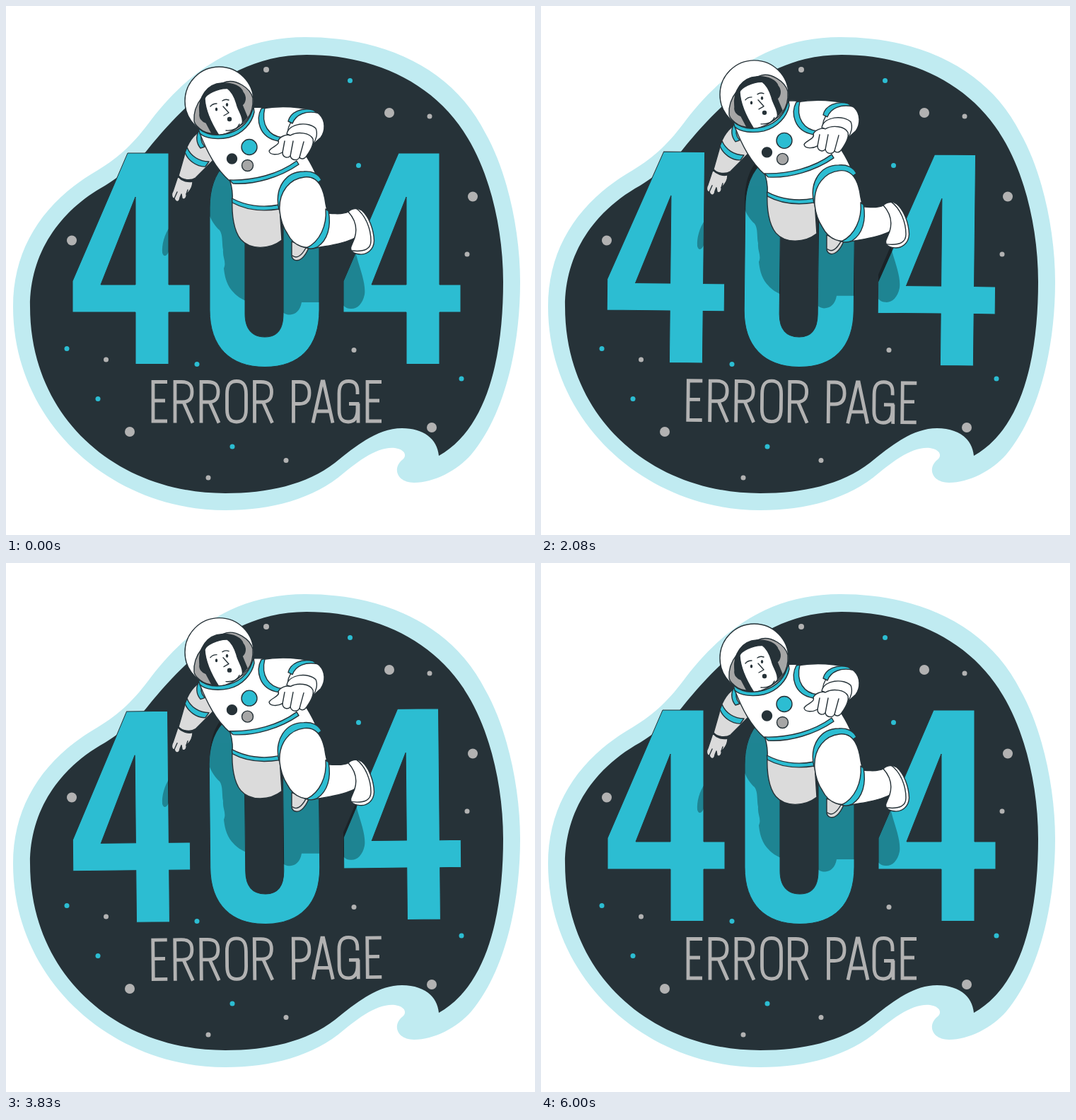
Animation, 748 px wide and 748 px high, one loop 6.04 s. Source, as an HTML page:

```html
<!DOCTYPE html>
<html lang="en">
<head>
<meta charset="utf-8">
<title>Error page</title>
<style>
html, body { margin: 0; width: 100%; height: 100%; overflow: hidden; background: #fff; }
svg { display: block; width: 100%; height: 100%; }
.w { fill: #fff; }
.g { fill: #dbdbdb; }
.m { fill: #a6a6a6; }
.c { fill: #2cbdd2; }
.d { fill: #263238; }
.n { fill: none; }
#hero { stroke: #263238; stroke-width: 1.4; stroke-linejoin: round; stroke-linecap: round; }
#hero .flat { stroke: none; }
</style>
</head>
<body>
<svg viewBox="0 0 748 748" role="img" aria-label="404 ERROR PAGE">
  <defs>
    <path id="four" d="M172 208H230V394H260V433H230V506.5H183V433H94V389ZM183 270L134 394H183Z"/>
    <path id="zero" d="M288 285C288 232 317 204 366 204S443 232 443 285V430C443 482 415 510.5 366 510.5S288 482 288 430ZM338 280V435C338 457 348 468 366 468S392 457 392 435V280C392 258 383 246 366 246S338 258 338 280Z"/>
    <clipPath id="digits" clip-rule="evenodd">
      <use href="#four"/><use href="#four" x="383"/><use href="#zero"/>
    </clipPath>
  </defs>

  <path fill="#c0ebf1" d="M10 425C10 340 55 275 130 232C160 214 182 193 206 160C256 96 322 44 423 44C540 44 634 92 678 180C709 235 727 318 727 390C727 482 705 578 658 634C638 657 605 674 577 674C553 674 546 654 560 642C568 636 564 627 550 625C528 623 505 638 478 660C435 697 375 713 310 713C150 713 10 590 10 425Z"/>
  <path class="d" d="M34 425C34 350 75 290 140 254C168 236 185 222 201 202C253 138 322 69 425 69C522 69 608 110 653 187C684 238 703 315 703 390C703 485 685 595 612 636C610 612 590 597 560 597C525 597 495 622 465 646C425 677 370 689 310 689C158 689 34 584 34 425Z"/>
  <g id="stars"></g>

  <g id="number" class="c" fill-rule="evenodd" stroke="#263238">
    <use href="#four"/><use href="#zero"/><use href="#four" x="383"/>
  </g>
  <g id="caption" fill="none" stroke="#b2b2b2" stroke-width="4.8" stroke-miterlimit="8">
    <path id="E" d="M228 531.500H208V587H228M208 558H225"/>
    <path id="R" d="M239 589.500V531.500H248C259 531.500 263 536 263 545.500S259 560 249 560H239M251 560L264 589.500"/>
    <use href="#R" x="37"/>
    <path d="M312.500 549C312.500 536 316.500 530.500 326 530.500S339.500 536 339.500 549V570C339.500 582 335.500 588 326 588S312.500 582 312.500 570Z"/>
    <use href="#R" x="112.500"/>
    <path d="M406.500 589.500V531.500H415C425 531.500 429 537 429 547S425 562.500 415 562.500H406.500"/>
    <path d="M434 589.500L447 531H449L462 589.500M437.500 573H458.500"/>
    <path d="M497 549V545C497 535 493 530.500 484.500 530.500C475 530.500 471 536 471 548V571C471 583 475 588 484 588C493 588 497 582 497 570V562.500H485M498 562V589.500"/>
    <use href="#E" x="303"/>
  </g>

  <g id="hero">
    <g clip-path="url(#digits)" class="flat" opacity=".3">
      <path d="M232 312C224 322 220 338 221 349C223 356 228 354 231 345Z"/>
      <path d="M286 200H446V419H418C416 431 409 436 402 436.500C396 437 392 434 388 430L345 418C334 417 324 408 319 402C311 392 309 380 308 371C312 362 306 356 307 345C305 335 307 324 302 317C296 312 290 303 286 292Z"/>
      <path d="M470 340H492L498 362C502 375 509 395 507 408C504 422 496 429 487 428C480 428 477 423 472 419Z"/>
    </g>

    <!-- far arm -->
    <path class="g" d="M273 178C262 185 254 200 252 212L244 240C250 247 262 247 268 243L297 214L281 186Z"/>
    <path class="c" d="M273 176C268 184 269 194 275 201L281 199C275 192 275 185 278 180Z"/>
    <path class="c" d="M256 200C261 212 273 220 287 220L282 227C270 228 257 218 253 207Z"/>
    <path class="g" d="M243 241L236 262C233 267 235 273 238 272C240 278 245 278 246 271L248 266L249 272C252 275 256 271 255 266C260 262 264 256 264 248C257 250 248 247 243 241Z"/>
    <path class="n" d="M238 272L242 263M255 266L257 260"/>

    <!-- far leg -->
    <path class="g" d="M404 333V352C404 360 412 362 418 357C423 353 426 347 428 342Z"/>
    <path class="n" d="M405 353C411 358 418 353 424 342"/>
    <path class="g" d="M320 274C319 295 322 318 332 330C345 345 372 345 390 331L387 285C360 288 340 284 320 274Z"/>

    <!-- torso -->
    <path class="w" d="M274 180C300 190 335 175 351 143C375 143 395 150 405 158L400 190L425 213C430 221 436 232 440 242L388 262L386 285C360 290 335 285 320 273C321 262 319 255 317 248C296 230 284 205 274 180Z"/>
    <path class="c" d="M319.500 272C338 282 362 286 386 281L387 287C362 291 338 288 320 278Z"/>
    <path class="c" d="M316 246C350 247 385 238 411 219L414 224C388 242 352 253 321 251Z"/>
    <circle class="c" cx="344" cy="199.500" r="11"/>
    <circle class="d" cx="319.500" cy="216" r="7"/>
    <circle class="m" cx="341.500" cy="225.500" r="8"/>

    <!-- near leg -->
    <path class="w" d="M440 291C455 293 475 296 484 291C496 301 498 315 493 328C482 334 462 338 450 340C440 342 425 344 420 340Z"/>
    <path class="w" d="M484 291C489 286 497 285 503 289C513 297 520 316 520.500 332C520 345 510 352 500 351C490 350 486 346 488 340L493 328C497 315 494 302 484 291Z"/>
    <path class="n" d="M495 286C509 296 516 316 516 332C516 343 508 348 489 346"/>
    <path class="c" d="M386 288C379 258 395 234 421 234C432 233 442 237 446 246Z"/>
    <path class="w" d="M387 290C385 262 402 244 422 242C440 240 449 256 452 280C457 300 458 325 441 338C425 346 407 340 398 322C390 310 388 300 387 290Z"/>
    <path class="c" d="M452 287C454 310 444 333 425 342C430 344 436 343 440 341C455 331 460 312 456 290Z"/>

    <!-- near arm -->
    <path class="w" d="M362 145C385 141 410 142 434 147L436 160L406 172L402 186C385 190 362 183 361 165Z"/>
    <path class="c" d="M361 145C353 160 357 186 385 191L391 186C372 184 360 168 366 144Z"/>
    <path class="w" d="M402 166C412 149 434 145 443 153C452 162 452 176 445 186L436 194L400 188C397 180 398 173 402 166Z"/>
    <path class="c" d="M399 163C402 150 418 143 434 147L440 151C424 148 410 153 405 166Z"/>
    <path class="w" d="M397 181C400 165 428 163 438 173C441 180 439 189 434 195Z"/>
    <path class="w" d="M372 205C375 199 388 197 385 190C388 184 397 181 402 183C412 177 430 179 434 188C436 196 430 205 425 212C422 217 417 217 415 214C412 219 404 219 402 212C398 216 391 214 391 207C384 211 373 211 372 205Z"/>
    <path class="n" d="M391 207L394 191M402 212L406 191M415 214L421 192"/>

    <!-- head -->
    <circle class="w" cx="301.500" cy="134.500" r="48.500"/>
    <path class="m" d="M266 163C264 140 282 115 312 107C325 104 345 115 349 130C350 145 345 155 341 160C330 175 300 187 279 177C271 172 267 168 266 163Z"/>
    <path class="d" d="M274 152C271 128 285 110 305 109C322 108 333 115 335 122C340 128 339 136 334 140L341 157C330 172 310 182 292 182L283 165C277 163 273 158 274 152Z"/>
    <path class="w" d="M281 131C282 125 299 116 313 116.500C318 120 323 128 326 138C328 148 337 158 334 166C325 176 312 181 301 183C294 172 282 150 281 131Z"/>
    <path class="n" d="M289 142Q292 138 298 138M306 134Q310 131 315 133M307 142L315 151L308 155M311 176Q326 177 330 167"/>
    <ellipse class="d flat" cx="297.500" cy="146" rx="1.700" ry="2.500"/>
    <ellipse class="d flat" cx="312.500" cy="139.500" rx="1.700" ry="2.500"/>
    <circle class="d flat" cx="316" cy="160" r="3.200"/>
    <path class="c" d="M272 173C285 184 300 184 315 180C335 174 346 160 350 142L351 150C348 165 335 181 315 186C300 189 282 188 274 180Z"/>
  </g>
</svg>
<script>
const byId = id => document.getElementById(id);

function addStars(color, stars) {
  byId('stars').innerHTML += stars.map(([x, y, r = 3.5]) =>
    `<circle cx="${x}" cy="${y}" r="${r}" fill="${color}"/>`).join('');
}
addStars('#b2b2b2', [[368, 90, 4], [542, 151, 7], [599, 156], [660, 269.5, 7], [652, 351], [93, 331.5, 7],
  [141.5, 500], [175, 602, 7], [492, 486.5], [602, 596, 7], [396, 642.5], [286, 667]]);
addStars('#2cbdd2', [[486.5, 105.5], [498.5, 225.5], [86, 484.5], [270, 506.5], [130, 555.5], [320, 623], [644, 527]]);

const LOOP = 6040, FPS = 24;

// Triangle wave with period 1: 0 at 0, 1 at 1/4, -1 at 3/4.
const triangle = p => 1 - 4 * Math.abs((p + 0.25) % 1 - 0.5);

function draw(ms) {
  const t = Math.floor((ms % LOOP + 5) * FPS / 1000) / FPS;
  const lift = 15 * (1 - Math.abs(1 - (t % 3) / 1.5));
  const tilt = triangle(t / 6);
  byId('hero').setAttribute('transform', `translate(0 ${-lift})`);
  byId('number').setAttribute('transform', `rotate(${tilt} 368.5 357)`);
  byId('caption').setAttribute('transform', `rotate(${tilt} 368.5 559)`);
}

const start = performance.now();
function tick() {
  draw(performance.now() - start);
  requestAnimationFrame(tick);
}
tick();
</script>
</body>
</html>
```
